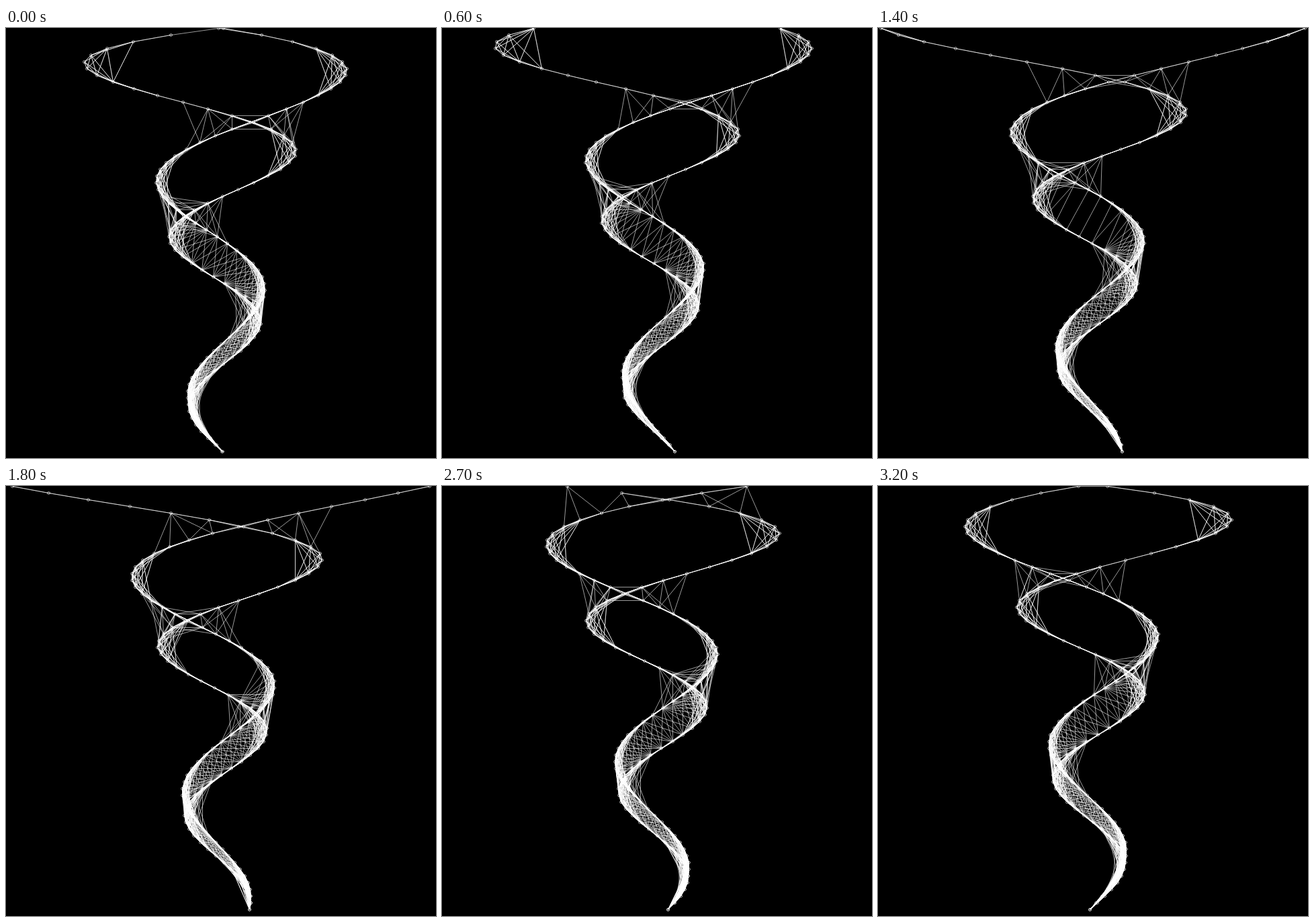
An HTML page with a canvas for the animation above (3300 ms loop, 640 by 640 pixels).

```html
<!DOCTYPE html>
<html lang="en">
<head>
<meta charset="utf-8">
<title>Twin spiral</title>
<style>
html, body { margin: 0; width: 100%; height: 100%; overflow: hidden; background: #000; }
canvas { display: block; width: 640px; height: 640px; }
</style>
</head>
<body>
<canvas id="stage" width="640" height="640"></canvas>
<script>
const SIZE = 640, GAP = 10, ROWS = SIZE / GAP;
const LOOP = 3300, STEP = 100;
const CROSS_REACH = 69, REACH_X = 73, REACH_Y = 70;
const ctx = document.getElementById('stage').getContext('2d');

const snap = v => Math.floor(v) + 0.5;

// One strand: the radius falls off with depth, the angle winds with the row.
function strand(side, twist, phase) {
  return Array.from({ length: ROWS }, (_, i) => {
    const y = i * GAP;
    const radius = SIZE / 2 * 100 / (100 + y);
    return { x: SIZE / 2 + side * radius * Math.sin(phase + twist * i), y, side };
  });
}

// Strokes are centred on whole pixels.
function line(a, b) {
  ctx.beginPath();
  ctx.moveTo(snap(a.x), snap(a.y));
  ctx.lineTo(snap(b.x), snap(b.y));
  ctx.stroke();
}

function node(p) {
  const x = snap(p.x), y = snap(p.y);
  ctx.beginPath();
  ctx.arc(x, y, 2, 0, Math.PI * 2);
  ctx.stroke();
  ctx.beginPath();
  ctx.arc(x, y, 0.5, 0, Math.PI * 2);
  ctx.fill();
}

// Neighbours on the same strand are joined twice, which brightens the strand.
function link(a, b) {
  const dx = a.x - b.x, dy = a.y - b.y;
  if (a.side !== b.side) {
    if (Math.hypot(dx, dy) < CROSS_REACH) line(a, b);
    return;
  }
  if (Math.hypot(dx / REACH_X, dy / REACH_Y) < 1) line(a, b);
  if (Math.hypot(dx, dy) < REACH_Y) line(a, b);
}

function draw(step) {
  const phase = 0.01 + step * 0.1;
  const points = [...strand(1, 0.2, phase), ...strand(-1, 0.25, phase)];
  ctx.fillStyle = '#000';
  ctx.fillRect(0, 0, SIZE, SIZE);
  ctx.fillStyle = ctx.strokeStyle = 'rgba(255, 255, 255, 0.6)';
  ctx.lineWidth = 1;
  ctx.lineCap = 'round';
  points.forEach((p, i) => {
    node(p);
    for (let j = i + 1; j < points.length; j++) link(p, points[j]);
  });
}

let shown = -1;
const start = performance.now();

function tick() {
  const ms = (performance.now() - start) % LOOP;
  const step = ms < 2 * STEP ? 0 : Math.floor(ms / STEP);
  if (step !== shown) draw(shown = step);
  requestAnimationFrame(tick);
}
tick();
</script>
</body>
</html>
```
